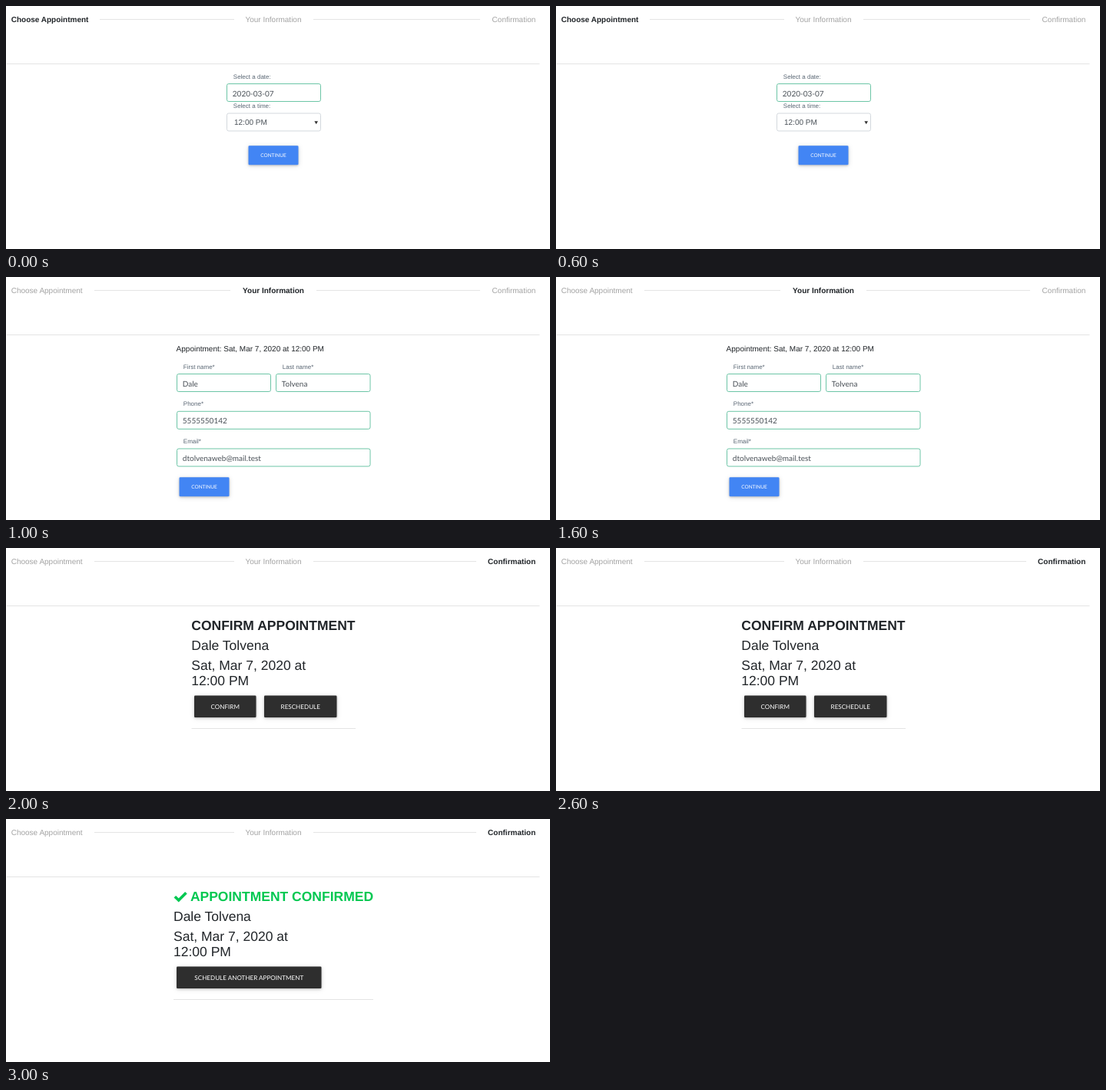
An HTML page for the animation above (4000 ms loop, 708 by 317 pixels).

```html
<!DOCTYPE html>
<html lang="en">
<head>
<meta charset="utf-8">
<title>Appointment booking</title>
<style>
  html, body { margin: 0; width: 100%; height: 100%; overflow: hidden; background: #fff; }
  svg { display: block; width: 708px; height: 317px; }
  text { font: 10px "Liberation Sans", Arial, sans-serif; fill: #212529; text-rendering: geometricPrecision; white-space: pre; }
  .step { fill: #a3a3a3; }
  .step.on { fill: #212529; font-weight: 700; }
  .label { font-size: 8px; fill: #596673; }
  .value { font-family: Lato, sans-serif; fill: #495057; }
  .choice { fill: #495057; }
  .big { font-size: 17.5px; }
  .bold { font-weight: 700; }
  .done { fill: #00c851; }
  .button { font-family: Lato, sans-serif; fill: #fff; text-anchor: middle; }
  .raised { filter: drop-shadow(0 1.25px 1.6px rgba(0, 0, 0, .2)) drop-shadow(0 1.25px 3px rgba(0, 0, 0, .12)); }
</style>
</head>
<body>
<svg id="stage" viewBox="0 0 708 317"></svg>
<script>
const HOLD = 1000;
const NAME = ["Dale", "Tolvena"];
const DAY = "Sat, Mar 7, 2020 at";
const TIME = "12:00 PM";

const text = (x, y, str, cls = "", attrs = "") =>
  `<text x="${x}" y="${y}" class="${cls}" ${attrs}>${str}</text>`;

const rule = (x1, x2, y, color = "#e4e4e4") =>
  `<path d="M${x1} ${y}H${x2}" stroke="${color}"/>`;

const box = (x, y, w, h, color) =>
  `<rect x="${x + .5}" y="${y + .5}" width="${w - 1}" height="${h - 1}" rx="2.3" fill="#fff" stroke="${color}"/>`;

const field = (x, y, w, label, value) =>
  text(x + 8.8, y - 6.5, label, "label") + box(x, y, w, 24, "#6cc5a6") + text(x + 7.8, y + 16.5, value, "value");

const button = (x, y, w, h, str, size, color) =>
  `<rect x="${x}" y="${y}" width="${w}" height="${h}" rx="1.3" fill="${color}" class="raised"/>` +
  text(x + w / 2, y + h / 2 + size * .36, str, "button", `style="font-size:${size}px"`);

const blueButton = (x, y) => button(x, y, 65, 25, "CONTINUE", 6.5, "#4285f4");
const darkButton = (x, w, str) => button(x, 192.5, w, 28.5, str, 8.1, "#2e2e2e");

// Step names with the two lines that fill the gaps between them
function header(active, lines) {
  const cls = i => i === active ? "step on" : "step";
  return text(6.7, 20.9, "Choose Appointment", cls(0)) +
    text(348, 20.9, "Your Information", cls(1), 'text-anchor="middle"') +
    text(689.3, 20.9, "Confirmation", cls(2), 'text-anchor="end"') +
    rule(lines[0], lines[1], 17.5) + rule(lines[2], lines[3], 17.5) +
    rule(1, 694.5, 75.5);
}

const details = x =>
  text(x, 133, NAME.join(" "), "big") + text(x, 158.6, DAY, "big") + text(x, 179.3, TIME, "big");

const check = '<path d="M219.8 101.2L224.7 106L234.4 96.2" fill="none" stroke="#00c851" stroke-width="3.7"/>';

const scenes = [
  header(0, [122, 297, 400, 617]) +
    field(287, 101, 123, "Select a date:", "2020-03-07") +
    text(295.8, 133.4, "Select a time:", "label") +
    box(287, 139.5, 123, 24, "#d3d8dd") +
    text(297, 155.2, TIME, "choice") +
    '<path d="M401.4 150.2H406L403.7 154.2Z" fill="#333"/>' +
    blueButton(315.5, 182.3),

  header(1, [115, 292, 404, 617]) +
    text(221.6, 96.6, `Appointment: ${DAY} ${TIME}`) +
    field(222, 126, 123, "First name*", NAME[0]) +
    field(351, 126, 123.5, "Last name*", NAME[1]) +
    field(222, 174.8, 252.5, "Phone*", "5555550142") +
    field(222, 223.5, 252.5, "Email*", "dtolvenaweb@mail.test") +
    blueButton(225.5, 261.2),

  header(2, [115, 297, 400, 612]) +
    text(241.3, 107.3, "CONFIRM APPOINTMENT", "big bold") +
    details(241.3) +
    darkButton(245, 80.5, "CONFIRM") +
    darkButton(336, 94.5, "RESCHEDULE") +
    rule(241.5, 455, 235.5),

  header(2, [115, 297, 400, 612]) +
    check +
    text(239.9, 107.3, "APPOINTMENT CONFIRMED", "big bold done") +
    details(218) +
    darkButton(222, 188.5, "SCHEDULE ANOTHER APPOINTMENT") +
    rule(218, 478, 235.5)
];

const stage = document.getElementById("stage");
const start = performance.now();
let shown = -1;

function draw(now) {
  const scene = Math.floor(Math.max(0, now - start) / HOLD) % scenes.length;
  if (scene !== shown) {
    stage.innerHTML = scenes[scene];
    shown = scene;
  }
  requestAnimationFrame(draw);
}
draw(start);
</script>
</body>
</html>
```
